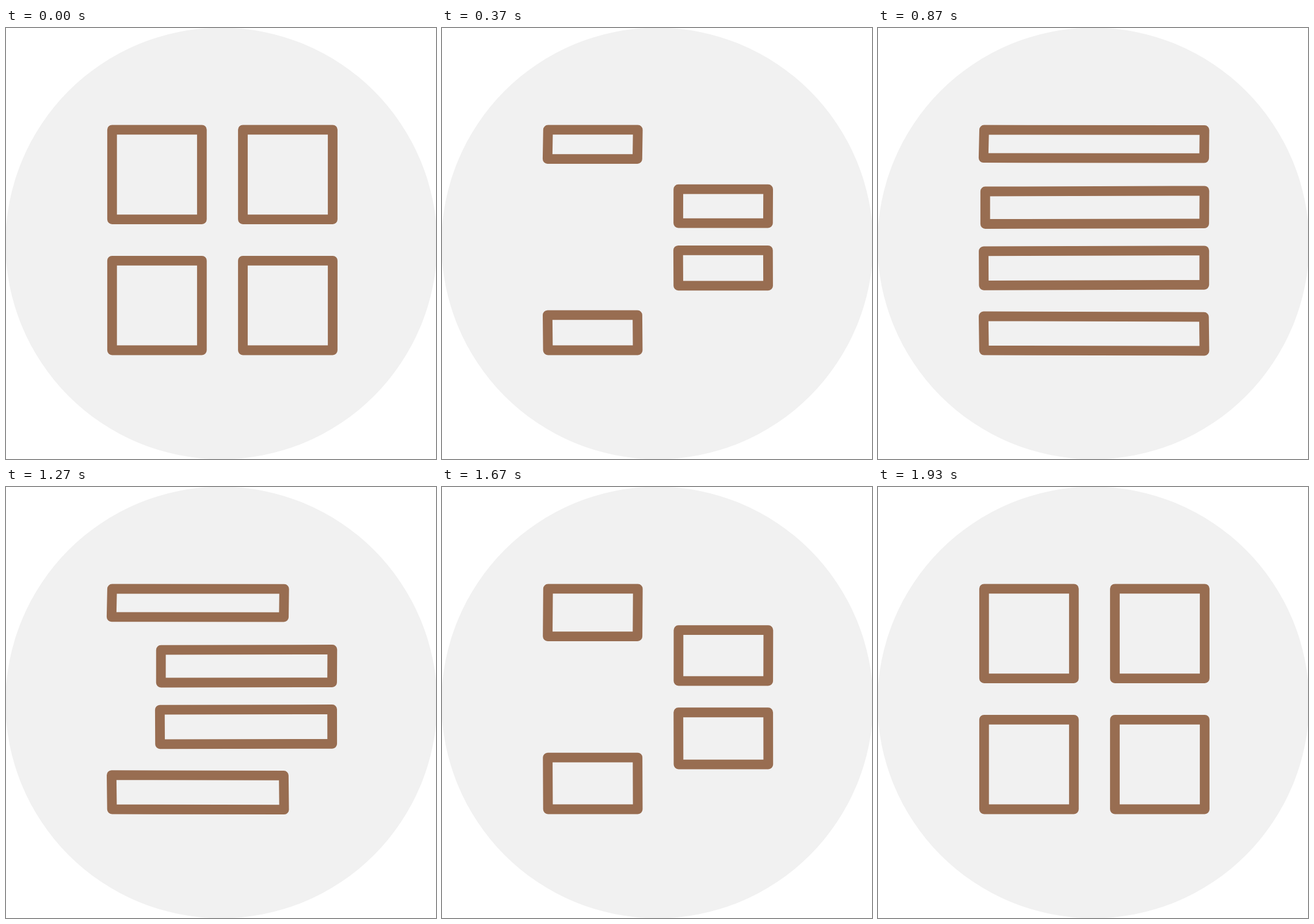
Animation of 747 by 749 pixels, one loop 2000 ms. Source, as an HTML page without scripts:

```html
<!DOCTYPE html>
<html lang="en">
<head>
<meta charset="utf-8">
<title>Grid to list icon</title>
<style>
  html, body { margin: 0; width: 100%; height: 100%; overflow: hidden; background: #fff; }
  svg { display: block; width: 100%; height: 100%; }

  .box {
    fill: none;
    stroke: #986d51;
    stroke-width: 16.8;
    stroke-linejoin: round;
    d: var(--square);
    animation: morph 2s cubic-bezier(.333, 0, .667, 1) infinite;
  }

  /* square -> flat -> wide, hold, and back */
  @keyframes morph {
    0%, 96.6%, 100% { d: var(--square); }
    20%, 75.75% { d: var(--flat); }
    43.4%, 55% { d: var(--wide); }
  }

  .a {
    --square: path("M184.3 176.8 L340.3 176.8 L340.3 332.6 L184.3 332.6 Z");
    --flat: path("M184.2 176.9 L340.2 176.9 L339.4 226 L183.3 226 Z");
    --wide: path("M184.4 177 L567.1 177.4 L566.6 226.2 L183.3 225.7 Z");
  }
  .b {
    --square: path("M411.5 176.8 L567.5 176.8 L567.5 332.6 L411.5 332.6 Z");
    --flat: path("M410.6 281.8 L566.6 281.8 L566.3 339.2 L410.5 339.2 Z");
    --wide: path("M186.3 284 L567 282.8 L566.7 339.7 L186.3 340.5 Z");
  }
  .c {
    --square: path("M411.5 404.3 L567.5 404.3 L567.5 560 L411.5 560 Z");
    --flat: path("M410.3 386 L566.3 386 L566.5 446.2 L410.6 446.2 Z");
    --wide: path("M183.5 387.8 L566.8 386.8 L566.8 446.3 L183.8 447.3 Z");
  }
  .d {
    --square: path("M184.3 404.3 L340.3 404.3 L340.3 560 L184.3 560 Z");
    --flat: path("M183.4 500.3 L339.5 500.3 L340 560 L184 560 Z");
    --wide: path("M183.4 501 L566.3 502.1 L567 561 L184.2 560.2 Z");
  }
</style>
</head>
<body>
<svg viewBox="0 0 747 749">
  <circle cx="374" cy="374.5" r="375" fill="#f1f1f1"/>
  <path class="box a"/>
  <path class="box b"/>
  <path class="box c"/>
  <path class="box d"/>
</svg>
</body>
</html>
```
